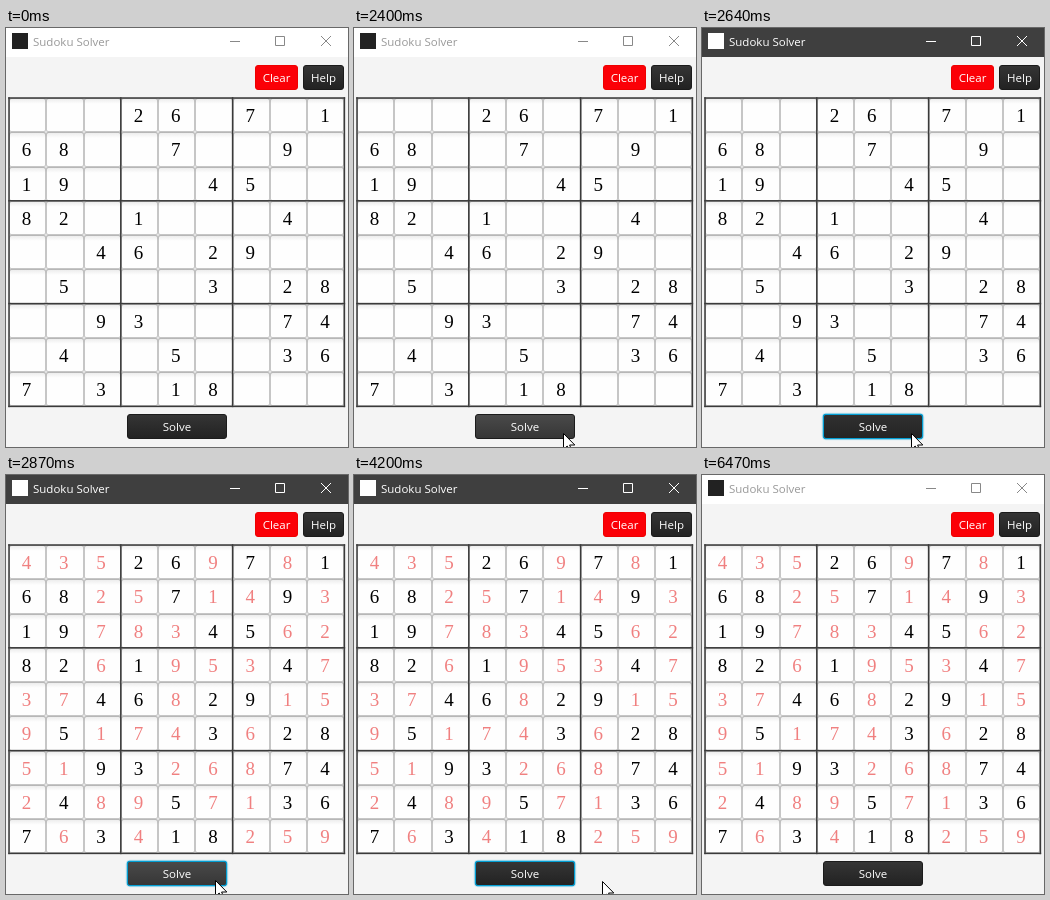
Write an HTML page that moves like this. It is 342 by 419 pixels and loops after 6.55 s.

```html
<!DOCTYPE html>
<html lang="en">
<head>
<meta charset="utf-8">
<title>Sudoku Solver</title>
<style>
html, body { margin: 0; width: 100%; height: 100%; overflow: hidden; background: #f4f4f4; }
svg { display: block; width: 342px; height: 419px; }
.ui { font: 11.5px "Open Sans", "Noto Sans", sans-serif; }
.digit { font: 19px "Liberation Serif", "Times New Roman", serif; text-anchor: middle; }
.label { fill: #fff; text-anchor: middle; }
</style>
</head>
<body>
<svg id="stage" viewBox="0 0 342 419">
  <defs>
    <linearGradient id="dark" x2="0" y2="1"><stop stop-color="#353535"/><stop offset="1" stop-color="#222"/></linearGradient>
    <linearGradient id="hover" x2="0" y2="1"><stop stop-color="#4a4a4a"/><stop offset="1" stop-color="#363636"/></linearGradient>
    <linearGradient id="pressed" x2="0" y2="1"><stop stop-color="#303030"/><stop offset="1" stop-color="#242424"/></linearGradient>
    <linearGradient id="border" x2="0" y2="1"><stop stop-color="#b5b5b5"/><stop offset=".15" stop-color="#c6c6c6"/></linearGradient>
    <linearGradient id="cell" x2="0" y2="1"><stop stop-color="#ededed"/><stop offset=".15" stop-color="#fefefe"/></linearGradient>
  </defs>
</svg>
<script>
const SIZE = { w: 342, h: 419 };
const LOOP = 6550;
const GRID = { x: 3, y: 70, w: 335.4, h: 308.4 };
const GIVEN = [
  '...26.7.1', '68..7..9.', '19...45..',
  '82.1...4.', '..46.29..', '.5...3.28',
  '..93...74', '.4..5..36', '7.3.18...'
];
const SOLVED = [
  '435269781', '682571493', '197834562',
  '826195347', '374682915', '951743628',
  '519326874', '248957136', '763418259'
];
// time, x, y of the pointer; no position means it is away
const POINTER = [
  [0], [2160, 224, 412], [2240, 219, 409], [2320, 213, 407], [2400, 209, 405],
  [4040, 216, 405], [4120, 229, 405], [4200, 248, 406], [4280, 272, 407],
  [4360, 298, 409], [4440, 323, 411], [4520]
];

const stage = document.getElementById('stage');

function add(tag, attrs, parent = stage, text) {
  const el = document.createElementNS('http://www.w3.org/2000/svg', tag);
  for (const key in attrs) el.setAttribute(key, attrs[key]);
  if (text) el.textContent = text;
  parent.appendChild(el);
  return el;
}

const rect = (x, y, width, height, fill, extra, parent) =>
  add('rect', { x, y, width, height, fill, ...extra }, parent);

function button(x, y, w, h, fill, edge, text, baseline) {
  const body = rect(x + .5, y + .5, w - 1, h - 1, fill, { rx: 2.5, stroke: edge });
  add('text', { class: 'ui label', x: x + w / 2, y: baseline }, stage, text);
  return body;
}

// window frame
rect(0, 0, SIZE.w, SIZE.h, '#f4f4f4');
const bar = rect(0, 0, SIZE.w, 29, '#fff');
const icon = rect(6, 5, 16, 16, '#222');
const title = add('text', { class: 'ui', x: 27, y: 18 }, stage, 'Sudoku Solver');
const controls = add('path', {
  d: 'M224 13.5h10M269.5 8.5h9v9h-9zM315 8l10 10M325 8l-10 10', fill: 'none'
});

button(249, 37, 43, 25, '#fb0007', '#ee0000', 'Clear', 54);
button(297, 37, 41, 25, 'url(#dark)', '#1b1b1b', 'Help', 54);

// board
const colX = c => GRID.x + c * GRID.w / 9;
const rowY = r => GRID.y + r * GRID.h / 9;

for (let r = 0; r < 9; r++) {
  for (let c = 0; c < 9; c++) {
    const x = Math.round(colX(c)), y = Math.round(rowY(r));
    const w = Math.round(colX(c + 1)) - x, h = Math.round(rowY(r + 1)) - y;
    rect(x, y, w, h, 'url(#border)', { rx: 2 });
    rect(x + 1, y + 1, w - 2, h - 2, 'url(#cell)', { rx: 1.5 });
  }
}
for (let i = 0; i <= 9; i += 3) {
  rect(colX(i) - .75, GRID.y - .75, 1.5, GRID.h + 1.5, '#3a3a3a');
  rect(GRID.x - .75, rowY(i) - .75, GRID.w + 1.5, 1.5, '#3a3a3a');
}

const answers = add('g', { fill: '#f08080' });
const clues = add('g', { fill: '#000' });
SOLVED.forEach((row, r) => [...row].forEach((n, c) => {
  const group = GIVEN[r][c] === '.' ? answers : clues;
  add('text', { class: 'digit', x: 20.5 + c * 37.3, y: Math.round(94 + r * 34.25) }, group, n);
}));

const solve = button(121, 386, 100, 25, 'url(#dark)', '#1b1b1b', 'Solve', 403);
const focus = add('g', { fill: 'none', stroke: '#039ed3' });
rect(120.3, 385.3, 101.4, 26.4, 'none', { rx: 3.5, 'stroke-opacity': .25 }, focus);
rect(121.4, 386.4, 99.2, 24.2, 'none', { rx: 2.5, 'stroke-width': 1.2 }, focus);

// pointer
const flash = add('circle', { cx: 209, cy: 405.5, r: 12, fill: '#d8cc18', 'fill-opacity': .8 });
const pointer = add('path', {
  d: 'M.5 .5V16.5L4.2 13L6.6 18.6L9 17.6L6.6 12H11.8Z',
  fill: '#fff', stroke: '#000', 'stroke-linejoin': 'round'
});

const show = (el, on) => el.setAttribute('visibility', on ? 'visible' : 'hidden');
const between = (t, from, to) => t >= from && t < to;

function draw(t) {
  const active = between(t, 2560, 6470);
  const [, x, y] = POINTER.filter(p => p[0] <= t).pop();
  const over = x !== undefined && x < 221;
  const pressed = between(t, 2560, 2870);

  bar.setAttribute('fill', active ? '#3f3f3f' : '#fff');
  icon.setAttribute('fill', active ? '#fff' : '#222');
  title.setAttribute('fill', active ? '#fff' : '#999');
  controls.setAttribute('stroke', active ? '#fff' : '#888');
  solve.setAttribute('fill', `url(#${pressed ? 'pressed' : over ? 'hover' : 'dark'})`);

  show(focus, active);
  show(answers, t >= 2870);
  show(flash, between(t, 2560, 2640));
  show(pointer, x !== undefined);
  if (x !== undefined) pointer.setAttribute('transform', `translate(${x} ${y})`);
}

const start = performance.now();
function tick() {
  draw((performance.now() - start) % LOOP);
  requestAnimationFrame(tick);
}
tick();
</script>
</body>
</html>
```
